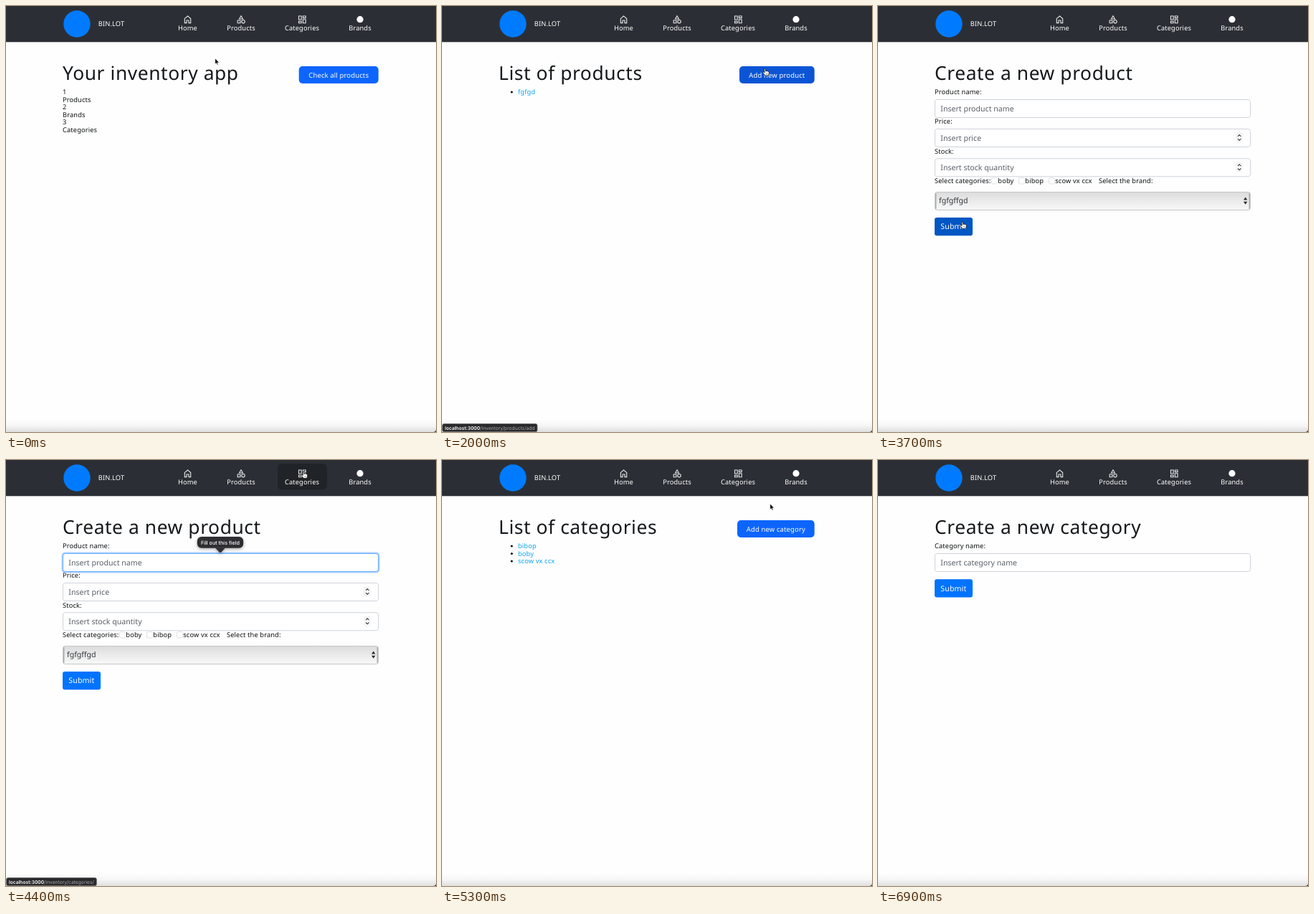
Recreate the animation shown at these times as an HTML page. Size 600 px wide and 594 px high, loop 7 s.

```html
<!DOCTYPE html>
<html lang="en">
<head>
<meta charset="utf-8">
<title>Inventory walkthrough</title>
<style>
  html, body { margin: 0; width: 100%; height: 100%; overflow: hidden; background: #fefefe; }
  svg { display: block; width: 600px; height: 594px; }
  text { font: 9.3px "Noto Sans", "Open Sans", sans-serif; letter-spacing: .12px;
         fill: #101214; text-rendering: geometricPrecision; white-space: pre; }
  .title { font-size: 26.4px; letter-spacing: .57px; fill: #16191c; }
  .field { font-size: 10.6px; letter-spacing: 0; fill: #596068; }
  .value { font-size: 10.6px; letter-spacing: 0; fill: #33383d; }
  .submit { font-size: 10.6px; fill: #fff; }
  .button { font-size: 9.5px; fill: #fff; }
  .nav { fill: #fff; }
  .link { font-weight: 500; fill: #12a5f4; }
  .host, .path { font: 600 6.7px Inter, sans-serif; letter-spacing: 0; fill: #fff; }
  .path { font-weight: 400; fill: #a9a9ab; }
  .hint { font: 500 7.2px Inter, sans-serif; letter-spacing: 0; fill: #fff; }
</style>
</head>
<body>
<svg id="stage" viewBox="0 0 600 594"></svg>
<script>
const LOOP = 7000, STEP = 100;

const nav = [
  { label: "Home", mid: 253.5, x: 230, w: 47 },
  { label: "Products", mid: 328, x: 298, w: 60.5 },
  { label: "Categories", mid: 413, x: 379, w: 69 },
  { label: "Brands", mid: 494, x: 468, w: 51 }
];

// time, x, y of the pointer tip
const route = [
  [0, 291.7, 73], [300, 428, 24], [500, 405, 22], [800, 253, 27],
  [1100, 319.3, 29], [1400, 319.3, 29], [1900, 452, 84], [2200, 443, 97.5],
  [3000, 443, 97.5], [3500, 122, 303], [3700, 116.7, 301], [3900, 116.7, 301],
  [4400, 414, 16], [4700, 414, 16], [5300, 457.7, 61], [5500, 456, 92],
  [5800, 456, 92], [6200, 496, 92]
];
const pageAt = [[0, "home"], [1300, "products"], [2500, "productForm"],
                [4600, "categories"], [5700, "categoryForm"]];
const statusAt = [
  [0, null], [300, "/inventory/categories/"], [600, "/inventory/products/"], [700, "/"],
  [1000, "/inventory/products/"], [1600, null], [2000, "/inventory/products/add"],
  [2800, null], [4300, "/inventory/categories/"], [4900, null],
  [5400, "/inventory/categories/add"], [6300, null]
];
const HINT = [3800, 4600], POINTER_END = 6300;

const text = (x, y, s, cls = "", anchor = "start") =>
  `<text x="${x}" y="${y}" class="${cls}" text-anchor="${anchor}">${s}</text>`;
const box = (x, y, w, h, r, fill, extra = "") =>
  `<rect x="${x}" y="${y}" width="${w}" height="${h}" rx="${r}" fill="${fill}" ${extra}/>`;
const path = (d, extra = "") => `<path d="${d}" ${extra}/>`;

const title = s => text(79, 103, s, "title");
const button = (x, label) =>
  box(x, 84, 519.7 - x, 24, 5, "#0d65fd", `class="hot" data-dark="#0b55d5"`) +
  text((x + 519.7) / 2, 99.6, label, "button", "middle");
const submit = y =>
  box(79, y, 53, 25.3, 3, "#0073ff", `class="hot" data-dark="#0056c3"`) +
  text(105.4, y + 16.3, "Submit", "submit", "middle");
const input = (y, hint) =>
  box(79.5, y + .5, 440, 25, 3, "#fff", `stroke="#ced3da"`) + text(87.3, y + 16.8, hint, "field");
const spinner = y =>
  box(500, y - 6.5, 8, 13, 3.5, "#fff", `stroke="#dedede" stroke-width=".7"`) +
  path(`M502 ${y - 1.7}l2.2 -2.3 2.2 2.3M502 ${y + 1.7}l2.2 2.3 2.2 -2.3`,
    `fill="none" stroke="#333" stroke-width="1.1"`);
const check = (x, label) =>
  box(x + .4, 239.6, 8.4, 8.4, 2, "#fff", `stroke="#d8d8d8" stroke-width=".8"`) +
  text(x + 9.3, 246.8, label);
const list = items => items.map((s, i) => {
  const y = 123 + i * 10.5;
  return `<circle cx="97.3" cy="${y - 3}" r="1.6" fill="#111"/>` + text(106, y, s, "link");
}).join("");

const pages = {
  home: title("Your inventory app") + button(408.7, "Check all products") +
    ["1", "Products", "2", "Brands", "3", "Categories"]
      .map((s, i) => text(79, 123 + i * 10.5, s)).join(""),
  products: title("List of products") + button(415, "Add new product") + list(["fgfgd"]),
  productForm: title("Create a new product") +
    text(79, 123, "Product name:") + input(130, "Insert product name") +
    text(79, 164.3, "Price:") + input(171, "Insert price") + spinner(183.5) +
    text(79, 205.5, "Stock:") + input(212.3, "Insert stock quantity") + spinner(224.8) +
    text(79, 246.8, "Select categories:") +
    check(158, "boby") + check(196, "bibop") + check(238, "scow vx ccx") +
    text(308, 246.8, "Select the brand:") +
    box(79.5, 259.5, 440, 25, 3, "url(#select)", `stroke="#c4c6c8"`) +
    path("M80.7 261v22M518.3 261v22", `stroke="#a9abad" stroke-width="1.4"`) +
    text(85, 275.2, "fgfgffgd", "value") +
    path("M510 270.5l2.7 -4 2.7 4zM510 272.7l2.7 4 2.7 -4z", `fill="#2c2c2c"`) + submit(295),
  categories: title("List of categories") + button(412, "Add new category") +
    list(["bibop", "boby", "scow vx ccx"]),
  categoryForm: title("Create a new category") +
    text(79, 123, "Category name:") + input(130, "Insert category name") + submit(166.3)
};

const icons =
  `<g fill="none" stroke="#e8e9ea" stroke-width="1.1">` +
  path("M249.3 17.6L253.5 14l4.2 3.6v6h-2.7v-3.6h-3v3.6h-2.7z") +
  path("M328 13.8l2.5 4.2h-5zM323.2 20h3.7v3.7h-3.7z") +
  `<circle cx="331" cy="21.7" r="2.2"/>` +
  path("M408.5 14h3.7v5h-3.7zM414.4 14h3.7v2.6h-3.7zM408.5 21.2h3.7v2.6h-3.7zM414.4 18.8h3.7v5h-3.7z") +
  `</g><circle cx="494" cy="18.7" r="4.6" fill="#fff"/>`;

const stage = document.getElementById("stage");
stage.innerHTML = `
  <defs>
    <linearGradient id="select" x2="0" y2="1">
      <stop stop-color="#dcdcdc"/><stop offset=".5" stop-color="#ebebeb"/><stop offset="1" stop-color="#f8f8f8"/>
    </linearGradient>
    <linearGradient id="floor" x2="0" y2="1">
      <stop stop-color="#fefefe"/><stop offset=".5" stop-color="#f6f6f6"/><stop offset="1" stop-color="#dedede"/>
    </linearGradient>
    <filter id="soft" x="-20%" y="-30%" width="140%" height="180%">
      <feDropShadow dx="0" dy="1.5" stdDeviation="2" flood-opacity=".35"/>
    </filter>
  </defs>` +
  box(0, 0, 600, 594, 0, "#fefefe") + box(0, 576, 600, 18, 0, "url(#floor)") +
  path("M600 590v4h-4q4 0 4 -4z", `fill="#333"`) +
  box(0, 0, 600, 50.3, 0, "#2b2f35") +
  nav.map(n => box(n.x, 5, n.w, 36.5, 6, "#202327", `class="tab"`)).join("") +
  `<circle cx="99" cy="25" r="18.7" fill="#007bff"/>` +
  text(128.8, 28.2, "BIN.LOT", "nav") + icons +
  nav.map(n => text(n.mid, 34.3, n.label, "nav", "middle")).join("") +
  Object.entries(pages).map(([k, v]) => `<g data-page="${k}">${v}</g>`).join("") +
  `<g id="hint">` +
  box(78.5, 129.5, 442, 27, 4, "none", `stroke="#a9d0ff" stroke-width="2"`) +
  box(79.5, 130.5, 440, 25, 3, "none", `stroke="#6aaeff"`) +
  `<g filter="url(#soft)" fill="#2e2e30">` + box(266.8, 107, 64.4, 15.8, 6) +
  path("M292 122.5h14l-5.6 6q-1.4 1.4 -2.8 0z") + `</g>` +
  text(299, 117.5, "Fill out this field", "hint", "middle") + `</g>` +
  `<g id="status">` + box(.5, 582.5, 122, 11.2, 2.5, "#29292b", `id="bar" stroke="#77777a" stroke-width=".8"`) +
  `<text x="4" y="590.6" class="host">localhost:3000<tspan id="url" class="path"></tspan></text></g>` +
  `<g id="arrow">` +
  path("M0 0v8l1.8 -1.6 1.2 2.9 1.5 -.6 -1.2 -2.8h2.5z",
    `fill="#000" stroke="#fff" stroke-width=".7" stroke-linejoin="round"`) + `</g>` +
  `<g id="hand">` +
  path("M0 .8q.9 -1.2 1.7 0l.5 2.9 .3 -.6q1 -.6 1.4 .4 1 -.6 1.4 .4 1.2 -.4 1.4 .8l-.2 2.6 -.9 2.3h-4.2l-1.8 -2.4 -1.9 -1.9q0 -1.1 1.2 -.9l1.5 1.1z",
    `fill="#fff" stroke="#111" stroke-width=".8" stroke-linejoin="round"`) +
  path("M3 6.2v2M4.3 6.2v2", `stroke="#333" stroke-width=".5"`) + `</g>`;

const get = id => document.getElementById(id);
const show = (el, on) => { el.style.display = on ? "" : "none"; };
const groups = [...stage.querySelectorAll("[data-page]")];
const tabs = [...stage.querySelectorAll(".tab")];
const hots = [...stage.querySelectorAll(".hot")].map(el => ({
  el, fill: el.getAttribute("fill"), page: el.closest("g").dataset.page
}));

const pick = (table, t) => table.filter(row => row[0] <= t).pop()[1];

function pointer(t) {
  const i = route.findIndex(p => p[0] > t);
  if (i < 0) return route[route.length - 1].slice(1);
  const [a, b] = [route[i - 1], route[i]];
  const u = (t - a[0]) / (b[0] - a[0]), e = u * u * (3 - 2 * u);
  return [a[1] + (b[1] - a[1]) * e, a[2] + (b[2] - a[2]) * e];
}

function inside(el, x, y) {
  const v = k => +el.getAttribute(k);
  return x >= v("x") && x <= v("x") + v("width") && y >= v("y") && y <= v("y") + v("height");
}

function draw(t) {
  const page = pick(pageAt, t), status = pick(statusAt, t), [x, y] = pointer(t);
  const live = t < POINTER_END;
  let over = false;
  groups.forEach(g => show(g, g.dataset.page === page));
  tabs.forEach(el => {
    const on = live && inside(el, x, y);
    show(el, on);
    over = over || on;
  });
  hots.forEach(({ el, fill, page: owner }) => {
    const on = live && owner === page && inside(el, x, y);
    el.setAttribute("fill", on ? el.dataset.dark : fill);
    over = over || on;
  });
  show(get("hint"), t >= HINT[0] && t < HINT[1]);
  show(get("status"), status);
  if (status) {
    get("url").textContent = status;
    get("bar").setAttribute("width", get("url").parentNode.getComputedTextLength() + 7);
  }
  for (const id of ["arrow", "hand"]) {
    show(get(id), live && (id === "hand") === over);
    get(id).setAttribute("transform", `translate(${x} ${y})`);
  }
}

const start = performance.now();
let last = -1;
function tick() {
  const t = Math.floor((performance.now() - start) % LOOP / STEP) * STEP;
  if (t !== last) draw(last = t);
  requestAnimationFrame(tick);
}
tick();
</script>
</body>
</html>
```
